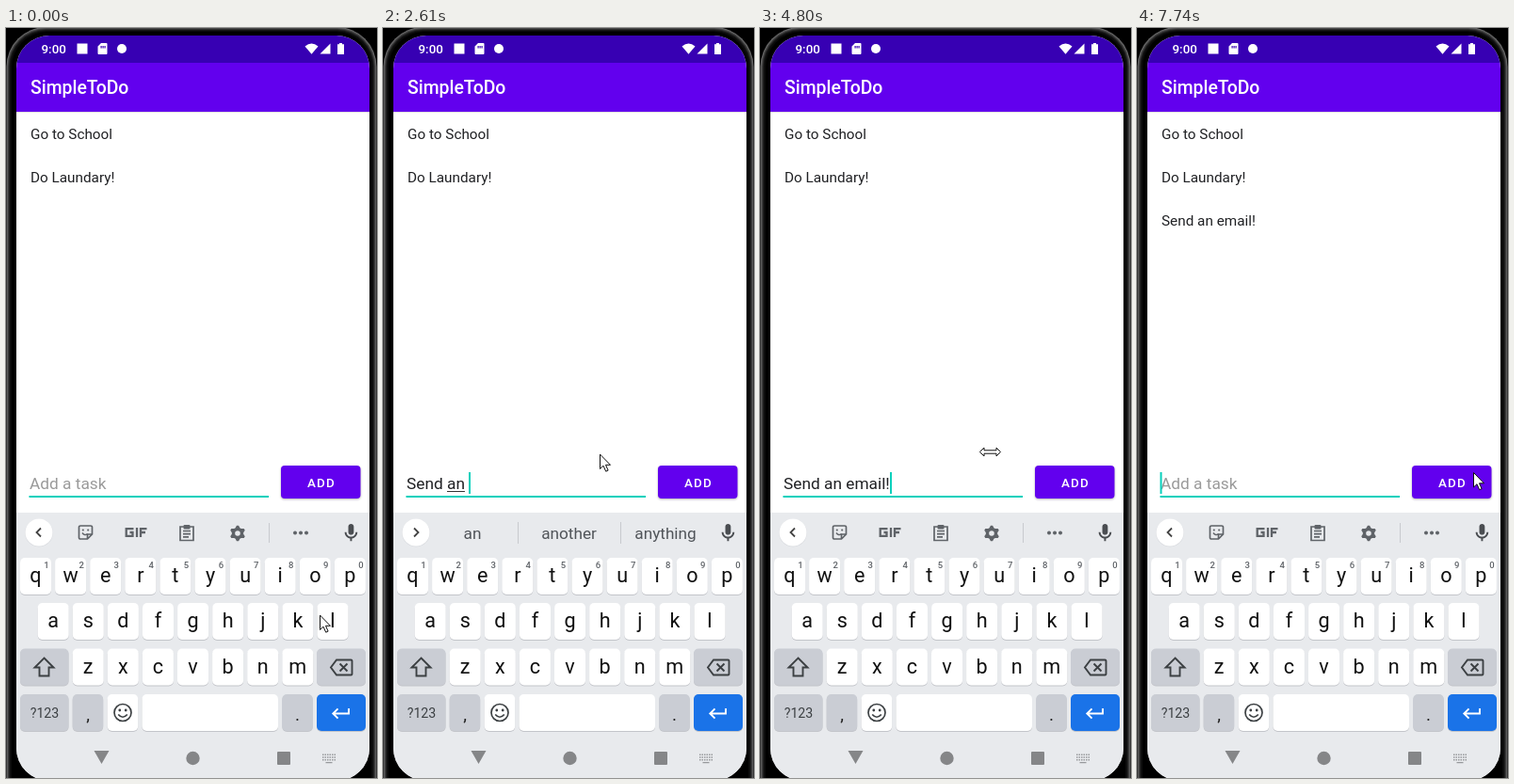
An HTML page with a canvas that plays this animation: 394x797 px, repeating every 8 s.

```html
<!DOCTYPE html>
<html lang="en">
<head>
<meta charset="utf-8">
<title>To-do list</title>
<style>
html, body { margin: 0; width: 100%; height: 100%; overflow: hidden; background: #000; }
canvas { display: block; width: 394px; height: 797px; }
</style>
</head>
<body>
<canvas id="stage"></canvas>
<script>
const W = 394, H = 797, LOOP = 8000, TAU = Math.PI * 2;
const canvas = document.getElementById('stage');
const ctx = canvas.getContext('2d');
const dpr = window.devicePixelRatio || 1;
canvas.width = W * dpr;
canvas.height = H * dpr;

const GREY = '#5f6368', DARK = '#202124', WORD = '#505459';
const PURPLE = '#6200ee', TEAL = '#06d0bc', PANEL = '#e8eaed';

// Each step overrides part of the state from its time on.
const START = {
  text: '', caret: false, mouse: [333.5, 624], pointer: 'arrow', bar: null,
  mark: null, shift: false, press: 0, items: ['Go to School', 'Do Laundary!']
};
const STEPS = [
  [150, { mouse: [252, 435.5] }],
  [300, { mouse: [230.5, 445.5], caret: true }],
  [580, { mouse: [230.5, 453] }],
  [890, { caret: false }],
  [1320, { text: 'S', mark: [0, 1], caret: true }],
  [1570, { text: 'Se', mark: [0, 2], bar: ['Se', 'We', 'SE'] }],
  [1840, { text: 'Send', mark: [0, 4] }],
  [1980, { text: 'Send ', bar: ['Send', 'Sends', 'Sending'] }],
  [2130, { mark: null, bar: ['me', 'the', 'it'] }],
  [2280, { text: 'Send a', mark: [5, 6] }],
  [2460, { text: 'Send an', mark: [5, 7], bar: ['an', 'another', 'anything'] }],
  [2610, { text: 'Send an ' }],
  [2760, { mark: null, bar: ['email', 'update', 'invite'] }],
  [3010, { text: 'Send an e', mark: [8, 9] }],
  [3150, { text: 'Send an em', mark: [8, 10], bar: ['em', 'email', 'emails'] }],
  [3300, { text: 'Send an emai', mark: [8, 12] }],
  [3500, { text: 'Send an email', mark: [8, 13], bar: ['emai', 'email', 'mail'] }],
  [3780, { shift: true }],
  [3930, { text: 'Send an email!', mark: null, bar: null, shift: false }],
  [4390, { caret: false }],
  [4530, { mouse: [300, 470] }],
  [4660, { mouse: [383, 502] }],
  [4800, { mouse: [244.5, 450.5], pointer: 'resize', caret: true }],
  [4940, { mouse: [268, 394.5], pointer: 'arrow' }],
  [5090, { mouse: [310, 430] }],
  [5370, { mouse: [347, 468], caret: false }],
  [5490, { mouse: [341, 473] }],
  [5640, { mouse: [335, 478] }],
  [5790, { mouse: [330.5, 480.5], caret: true }],
  [6350, { caret: false }],
  [6630, { press: 1 }],
  [6770, { text: '', caret: true, items: [...START.items, 'Send an email!'] }],
  [6900, { press: 0.5 }],
  [7170, { press: 0 }],
  [7290, { caret: false }],
  [7590, { mouse: [350, 476] }],
  [7740, { mouse: [357.5, 472.5], caret: true }]
];

function stateAt(t) {
  const s = { ...START };
  for (const [at, change] of STEPS) if (t >= at) Object.assign(s, change);
  return s;
}

function label(str, x, y, size, color, weight = 400, align = 'left', spacing = 0) {
  ctx.font = `${weight} ${size}px Roboto, sans-serif`;
  ctx.letterSpacing = spacing + 'px';
  ctx.fillStyle = color;
  ctx.textAlign = align;
  ctx.fillText(str, x, y);
  ctx.letterSpacing = '0px';
}

function rect(x, y, w, h, color, r = 0) {
  ctx.fillStyle = color;
  ctx.beginPath();
  ctx.roundRect(x, y, w, h, r);
  ctx.fill();
}

function disc(x, y, r, color) {
  ctx.fillStyle = color;
  ctx.beginPath();
  ctx.arc(x, y, r, 0, TAU);
  ctx.fill();
}

// SVG path placed at x, y: filled, stroked or both.
function shape(d, x, y, { fill, stroke, width = 1.5, scale = 1 }) {
  const p = new Path2D(d);
  ctx.save();
  ctx.translate(x, y);
  ctx.scale(scale, scale);
  if (fill) { ctx.fillStyle = fill; ctx.fill(p, 'evenodd'); }
  if (stroke) { ctx.strokeStyle = stroke; ctx.lineWidth = width; ctx.stroke(p); }
  ctx.restore();
}

// Black body whose rim fades from grey at the outside.
function phone() {
  rect(0, 0, W, H, '#000');
  ['#6a6a6a', '#4a4a4a', '#2c2c2c', '#161616', '#0a0a0a'].forEach((color, i) =>
    rect(i + 0.5, i - 1, W - 1 - 2 * i, 850, color, 42 - i));
  rect(6, 4, W - 12, 850, '#000', 38);
}

function header() {
  rect(11, 8, 375, 29, '#3700b3');
  rect(11, 37, 375, 52, PURPLE);
  rect(11, 89, 375, 1, 'rgba(0,0,0,.12)');
  label('9:00', 37.5, 27, 13.4, '#fff', 500);
  rect(75.5, 16.5, 11, 11, '#fff');
  shape('M3.5 0H9a1 1 0 0 1 1 1V11a1 1 0 0 1-1 1H1a1 1 0 0 1-1-1V3.5ZM3 3V5.5H4.2V3ZM5 3V5.5H6.2V3ZM7 3V5.5H8.2V3Z', 97.5, 16, { fill: '#fff' });
  disc(123, 22, 5, '#fff');
  shape('M0 3.2Q7 -2.8 14 3.2L7 11.6Z', 317.5, 16.2, { fill: '#fff' });
  shape('M11 0V11H0Z', 333.5, 16.5, { fill: '#fff' });
  shape('M2 0H5V1.3H7V12H0V1.3H2Z', 352, 16, { fill: '#fff' });
  label('SimpleToDo', 26, 70, 19.4, '#fff', 500);
}

function field(s) {
  s.items.forEach((item, i) => label(item, 26, 118.3 + i * 45.8, 15.3, DARK));
  const x = 25, size = 17.3;
  if (s.text) label(s.text, x, 490, size, DARK);
  else label('Add a task', x, 490, size, '#9a9a9a');
  const end = n => x + ctx.measureText(s.text.slice(0, n)).width;
  if (s.mark) {
    const from = end(s.mark[0]);
    rect(from, 492, end(s.mark[1]) - from, 1, '#333');
  }
  rect(24.5, 497, 254.5, 2, TEAL);
  if (s.caret) rect(s.text ? Math.round(end(s.text.length)) : 24.5, 472, 2, 23, TEAL);
}

function button(press) {
  ctx.save();
  ctx.shadowColor = 'rgba(0,0,0,.3)';
  ctx.shadowBlur = (2.5 + press * 5) * dpr;
  ctx.shadowOffsetY = (1 + press * 2) * dpr;
  rect(292, 465, 84.5, 35, PURPLE, 4);
  ctx.restore();
  if (press) rect(292, 465, 84.5, 35, `rgba(255,255,255,${0.22 * press})`, 4);
  label('ADD', 320, 487.8, 13.4, '#fff', 500, 'left', 1.2);
}

function gear(x, y) {
  ctx.beginPath();
  for (let i = 0; i < 24; i++) {
    const a = (i - 0.5) * TAU / 24, r = i % 4 < 2 ? 8.4 : 6.2;
    ctx.lineTo(x + r * Math.sin(a), y - r * Math.cos(a));
  }
  ctx.closePath();
  ctx.moveTo(x + 2.8, y);
  ctx.arc(x, y, 2.8, 0, TAU);
  ctx.fillStyle = GREY;
  ctx.fill('evenodd');
}

function tools() {
  shape('M-5.5 -7H5.5A1.5 1.5 0 0 1 7 -5.5V2L2 7H-5.5A1.5 1.5 0 0 1 -7 5.5V-5.5A1.5 1.5 0 0 1 -5.5 -7ZM2 7V2H7', 84.5, 536, { stroke: GREY, width: 1.7 });
  shape('M-3.5 .5Q-1 4 2 1.5', 84.5, 536, { stroke: GREY });
  disc(81.8, 533.5, 1.1, GREY);
  disc(87.2, 533.5, 1.1, GREY);
  shape('M9 1.2H1.2V8.8H8V5H5M12.5 0V10M16.5 10V1.2H23M16.5 5H21.5', 126.5, 531, { stroke: GREY, width: 2.3 });
  shape('M-7 -6.5H7V8H-7ZM-4 -2H4M-4 1.2H4M-4 4.4H2', 192, 536.5, { stroke: GREY, width: 1.7 });
  rect(188.5, 528, 7, 4.5, GREY, 1);
  gear(246, 537);
  rect(279, 526, 1, 21, '#c8cace');
  for (let i = 0; i < 3; i++) disc(307 + i * 6, 536.5, 2, GREY);
}

function envelope(x, y, w, tilt) {
  ctx.save();
  ctx.translate(x, y);
  ctx.transform(1, 0, tilt, 1, 0, 0);
  shape(`M${-w} -6H${w}V6H${-w}ZM${-w} -6L0 1.5L${w} -6M${-w} 6L-3 -1M${w} 6L3 -1`, 0, 0, { fill: '#f2f9fd', stroke: '#8dcdec', width: 1 });
  ctx.restore();
  if (tilt) shape('M-9 -3H-5M-10 0H-6M-11 3H-7', x, y, { stroke: '#8dcdec', width: 1 });
}

function suggestions(words) {
  const mail = words[2] === 'mail';
  label(words[0], 95, 542.5, 17.2, WORD, 400, 'center');
  label(words[1], 197.5, 542.5, 17.2, WORD, 400, 'center');
  for (const x of mail ? [143, 252, 300] : [143, 252]) rect(x, 525, 1, 23, '#c8cace');
  if (mail) {
    envelope(276.5, 536.5, 9, 0);
    envelope(326, 536.5, 7.5, -0.2);
  } else label(words[2], 300, 542.5, 17.2, WORD, 400, 'center');
}

function key(x, y, w, color = '#fff') {
  rect(x, y + 1, w, 39, '#c3c5ca', 5);
  rect(x, y, w, 39, color, 5);
}

function letters(row, x, y, shift, digits) {
  [...row].forEach((c, i) => {
    const left = x + i * 37.1;
    key(left, y, 33);
    label(shift ? c.toUpperCase() : c, left + 16.5, y + 26, 21.6, '#111', 400, 'center');
    if (digits) label((i + 1) % 10, left + 28, y + 11, 9.5, GREY, 500, 'center');
  });
}

function keyboard(s) {
  const special = '#cacdd4';
  rect(11, 515, 375, 290, PANEL);
  disc(35, 536.5, 15, '#dcdee2');
  disc(35, 536, 14.5, '#fff');
  const d = s.bar ? 1 : -1;
  shape(`M${-2 * d} -4.5L${2.5 * d} 0L${-2 * d} 4.5`, 35, 536, { stroke: '#444', width: 1.8 });
  if (s.bar) suggestions(s.bar); else tools();
  shape('M12 14c1.66 0 3-1.34 3-3V5c0-1.66-1.34-3-3-3S9 3.34 9 5v6c0 1.66 1.34 3 3 3zM17 11c0 2.76-2.24 5-5 5s-5-2.24-5-5H5c0 3.53 2.61 6.43 6 6.92V21h2v-3.08c3.39-.49 6-3.39 6-6.92z',
    354.8, 525, { fill: '#4a4d51', scale: 0.97 });

  letters('qwertyuiop', 15, 563, s.shift, true);
  letters('asdfghjkl', 33.7, 611, s.shift);
  key(15, 659.5, 51.5, special);
  letters('zxcvbnm', 70.7, 659.5, s.shift);
  key(330, 659.5, 52, special);
  shape('M0 -10L10 0H5V9H-5V0H-10Z', 40.5, 679.5, { stroke: '#3c4043', width: 1.9, fill: s.shift && '#3c4043' });
  shape('M-5 -8H10.5Q11.5 -8 11.5 -7V7Q11.5 8 10.5 8H-5L-11 0ZM-1.5 -4L6.5 4M6.5 -4L-1.5 4', 356, 679.5, { stroke: '#3c4043', width: 1.9 });

  key(15, 708, 51.5, special);
  key(70.7, 708, 32.5, special);
  key(107.7, 708, 32.5);
  key(144.5, 708, 144.5);
  key(293.3, 708, 32.5, special);
  key(330, 708, 52, '#1a73e8');
  label('?123', 41, 733, 14.2, '#3c4043', 400, 'center');
  label(',', 87, 736, 19, '#222', 400, 'center');
  label('.', 309.5, 736, 19, '#222', 400, 'center');
  shape('M9 0A9 9 0 1 1 -9 0A9 9 0 1 1 9 0ZM-4.8 2Q0 7.5 4.8 2', 124, 727.5, { stroke: '#3c4043', width: 1.7 });
  disc(120.8, 725, 1.4, '#3c4043');
  disc(127.2, 725, 1.4, '#3c4043');
  shape('M8.5 -4.5V1H-8M-3 -4.2L-8.2 1L-3 6.2', 355.5, 727.5, { stroke: '#fff', width: 1.9 });
}

function navigation() {
  const grey = '#858688';
  shape('M-8 -7H8L0 7Z', 101.5, 775, { fill: grey });
  disc(198.5, 776, 7.2, grey);
  rect(288, 769, 14, 14, grey, 1);
  for (let r = 0; r < 3; r++)
    for (let c = 0; c < 6; c++) rect(336 + c * 2.5, 771.5 + r * 2.7, 1.5, 1.5, '#97999c');
  rect(339.5, 780, 7, 1.3, '#97999c');
}

function pointer(s) {
  const d = s.pointer === 'arrow'
    ? 'M0 0V15.5L3.5 12.2L6.2 18.2L8.6 17.1L6 11.3H11Z'
    : 'M-11 0L-6.5 -4.5V-1.7H6.5V-4.5L11 0L6.5 4.5V1.7H-6.5V4.5Z';
  shape(d, ...s.mouse, { fill: '#fff', stroke: '#111', width: 1 });
}

function draw(t) {
  const s = stateAt(t);
  ctx.setTransform(dpr, 0, 0, dpr, 0, 0);
  phone();
  ctx.save();
  ctx.beginPath();
  ctx.roundRect(11, 8, 375, 792, 35);
  ctx.clip();
  rect(11, 8, 375, 792, '#fff');
  header();
  field(s);
  button(s.press);
  keyboard(s);
  navigation();
  ctx.restore();
  pointer(s);
}

const begin = performance.now();
function tick() {
  draw((performance.now() - begin) % LOOP);
  requestAnimationFrame(tick);
}
tick();
</script>
</body>
</html>
```
